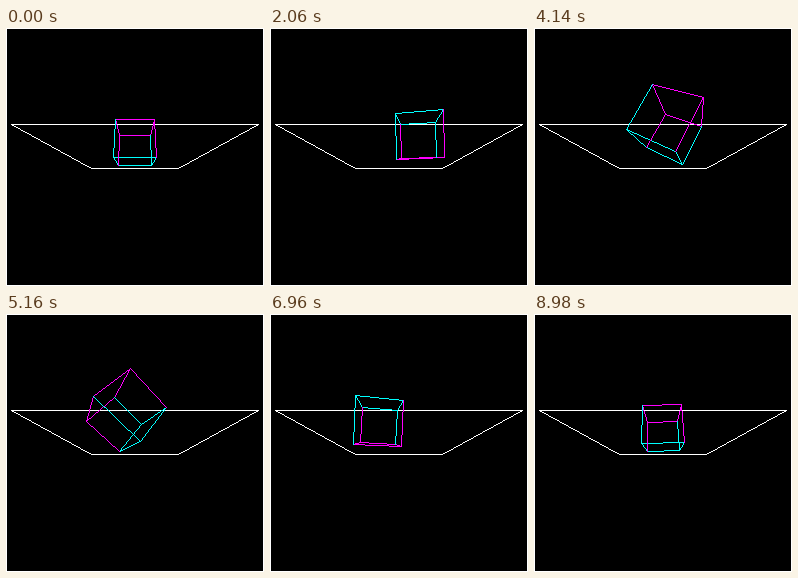
Write an HTML page with a canvas that moves like this. It is 258 by 258 pixels and loops after 9000 ms.

```html
<!DOCTYPE html>
<html>
<head>
<meta charset="utf-8">
<style>
html, body { margin: 0; width: 100%; height: 100%; overflow: hidden; background: #000; }
canvas { display: block; width: 258px; height: 258px; image-rendering: pixelated; }
</style>
</head>
<body>
<canvas id="stage" width="258" height="258"></canvas>
<script>
const ctx = document.getElementById('stage').getContext('2d');
const LOOP = 9000, STEP = 20, FOCAL = 128, MID = 129, DIST = 6;
const TILT = Math.PI / 12;
const CORNERS = [[-1, -1], [1, -1], [1, 1], [-1, 1]];

// World to screen: x right, y up, z away from the viewer.
function project([x, y, z]) {
  const c = Math.cos(TILT), s = Math.sin(TILT);
  const k = FOCAL / (DIST + y * s + z * c);
  return [Math.floor(MID + x * k), Math.floor(MID - (y * c - z * s) * k)];
}

// Hard-edged line, one pixel wide.
function line(a, b, color) {
  const [x0, y0] = project(a), [x1, y1] = project(b);
  const n = Math.max(Math.abs(x1 - x0), Math.abs(y1 - y0), 1);
  ctx.fillStyle = color;
  for (let i = 0; i <= n; i++) {
    ctx.fillRect(Math.round(x0 + (x1 - x0) * i / n), Math.round(y0 + (y1 - y0) * i / n), 1, 1);
  }
}

function loop(points, color) {
  points.forEach((p, i) => line(p, points[(i + 1) % points.length], color));
}

// Spin at double speed, turn once, and circle the floor's centre the other way.
function place(x, y, z, a) {
  const c = Math.cos(a), s = Math.sin(a);
  const c2 = Math.cos(2 * a), s2 = Math.sin(2 * a);
  const u = x * c2 + y * s2, v = y * c2 - x * s2;
  return [u * c - z * s + s, v + 1, u * s + z * c + c];
}

function draw(t) {
  const a = Math.floor(t % LOOP / STEP) * STEP / LOOP * 2 * Math.PI;
  ctx.fillStyle = '#fff';
  ctx.fillRect(0, 0, 258, 258);
  ctx.fillStyle = '#000';
  ctx.fillRect(1, 1, 256, 256);

  loop(CORNERS.map(([x, z]) => [3 * x, 0, 3 * z]), '#fff');

  const top = CORNERS.map(([x, z]) => place(x, 1, z, a));
  const bottom = CORNERS.map(([x, z]) => place(x, -1, z, a));
  loop(top, '#f0f');
  loop(bottom, '#0ff');
  top.forEach((p, i) => line(p, bottom[i], i % 2 ? '#f0f' : '#0ff'));
}

const start = performance.now();
function tick() {
  draw(performance.now() - start);
  requestAnimationFrame(tick);
}
draw(0);
requestAnimationFrame(tick);
</script>
</body>
</html>
```
